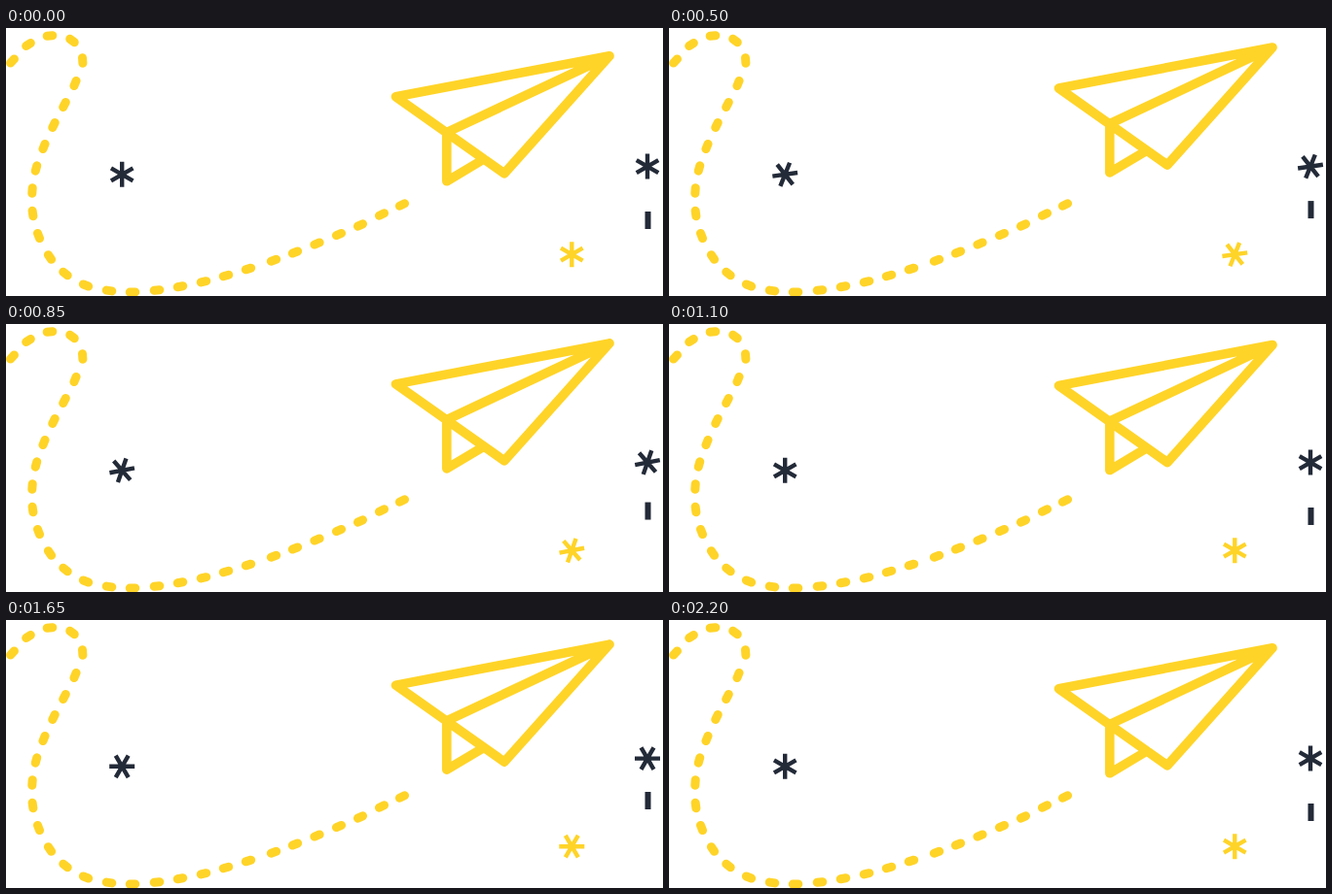
An HTML page that plays this animation: 675 by 276 pixels, repeating every 2250 ms.

```html
<!DOCTYPE html>
<html lang="en">
<head>
<meta charset="utf-8">
<title>Paper plane</title>
<style>
  html, body { margin: 0; width: 100%; height: 100%; overflow: hidden; background: #fff; }
  svg { display: block; width: 675px; height: 276px; }
  .line { fill: none; stroke: #ffd428; stroke-linecap: round; stroke-linejoin: round; }
  .star { stroke-width: 4.4; }
</style>
</head>
<body>
<svg viewBox="0 0 675 276">
  <defs>
    <path id="star" d="M0-13V13M-11.26-6.5L11.26 6.5M-11.26 6.5L11.26-6.5"/>
  </defs>
  <path id="trail" class="line" stroke-width="9"/>
  <path id="plane" class="line" stroke-width="9.6"
    d="M400.5 70.8L620 28.8L512 149.8ZM620 28.8L452.8 107.5V157.8L491 135"/>
  <rect id="bar" x="656.5" y="189" width="6" height="18" fill="#232a38"/>
  <g id="stars"></g>
</svg>
<script>
const get = id => document.getElementById(id);
const FRAME = 50, FRAMES = 45, CYCLE = 2200;

// Trail: a short dash at each centre, aimed along its neighbours
const centres = [
  [6.5, 34], [23, 17], [45, 8], [68, 13], [78.7, 33.5], [71, 57], [60, 79], [49, 100],
  [39, 122], [31, 144.5], [27, 167.5], [27.5, 191], [33.5, 214], [45, 236], [61, 253],
  [82, 265], [106, 270.5], [130, 272], [155, 270], [179, 266.3], [203, 261.3],
  [226, 255], [249, 248], [275, 239.3], [297, 231], [319.5, 222], [342, 212.5],
  [364, 203], [386, 192], [407, 182]
];
get('trail').setAttribute('d', centres.map(([x, y], i) => {
  const a = centres[i - 1] || [x, y], b = centres[i + 1] || [x, y];
  const dx = b[0] - a[0], dy = b[1] - a[1], k = 2.8 / Math.hypot(dx, dy);
  return `M${x - dx * k} ${y - dy * k}L${x + dx * k} ${y + dy * k}`;
}).join(''));

const stars = [[119.2, 150.8, '#232a38'], [659, 142.6, '#232a38'], [581.3, 233.2, '#ffd428']]
  .map(([x, y, colour]) => {
    const el = document.createElementNS('http://www.w3.org/2000/svg', 'use');
    el.setAttribute('href', '#star');
    el.setAttribute('class', 'star');
    el.setAttribute('stroke', colour);
    get('stars').append(el);
    return { el, x, y };
  });

// Linear rise to 1 at the peak, then linear fall to 0 at the end
const ramp = (t, peak, end) => t < peak ? t / peak : (end - t) / (end - peak);
const shift = (id, y) => get(id).setAttribute('transform', `translate(0 ${y})`);

function draw(now) {
  const t = Math.floor(now / FRAME) % FRAMES * FRAME;
  shift('plane', -10.6 * ramp(t, 600, CYCLE));
  shift('bar', -12 * ramp(t % 1100, 550, 1100));
  for (const { el, x, y } of stars)
    el.setAttribute('transform', `translate(${x} ${y}) rotate(${360 * t / CYCLE})`);
}

let start;
function tick(now) {
  start ??= now;
  draw(now - start);
  requestAnimationFrame(tick);
}
draw(0);
requestAnimationFrame(tick);
</script>
</body>
</html>
```
